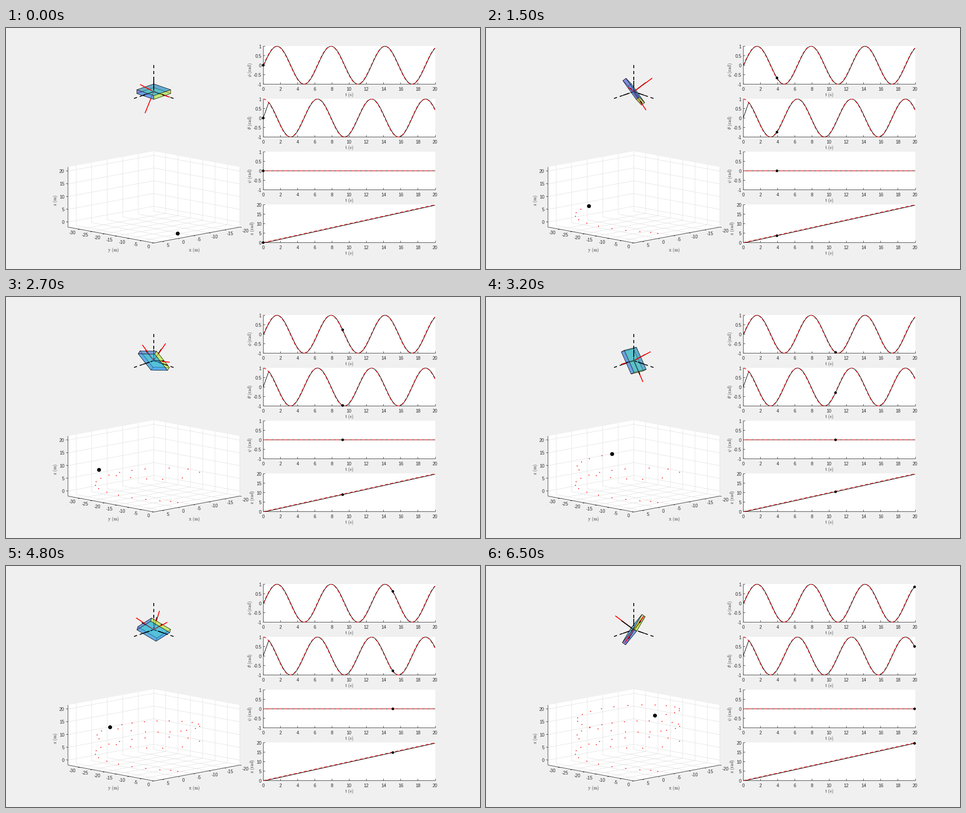
Write a matplotlib script that moves like this. It is 1049x534 px and loops after 6600 ms.

```python
import numpy as np
import matplotlib.pyplot as plt
from matplotlib.animation import FuncAnimation
from matplotlib.patches import Circle, Polygon

plt.rcParams["font.family"] = "Liberation Sans"
plt.rcParams["mathtext.fontset"] = "cm"
plt.rcParams["lines.scale_dashes"] = False
plt.rcParams["toolbar"] = "None"

W, H, DPI = 1049, 534, 100
PX = 72 / DPI
INK = "#262626"
GRID = "#e2e2e2"
RED = (1, 0, 0)

fig = plt.figure(figsize=(W / 100 + 1e-4, H / 100 + 1e-4), dpi=DPI, facecolor="#f0f0f0")
ax = fig.add_axes([0, 0, 1, 1])
# whole numbers fall on pixel centres
ax.set_xlim(-0.5, W - 0.5)
ax.set_ylim(H - 0.5, -0.5)
ax.axis("off")


def line(xs, ys, color=INK, lw=0.9, ls="-", z=1.0):
    art, = ax.plot(xs, ys, color=color, lw=lw * PX, ls=ls, zorder=z,
                   solid_capstyle="butt", dash_capstyle="butt")
    return art


def shape(points, color, z=0.0, edge="none", lw=0.0):
    return ax.add_patch(Polygon(points, closed=True, fc=color, ec=edge, lw=lw * PX,
                                zorder=z, joinstyle="round"))


def dot(x, y, r, color="black", z=20):
    return ax.add_patch(Circle((x, y), r, fc=color, ec="none", zorder=z))


def label(x, y, s, ha="center", rot=0, size=10):
    ax.text(x, y, s, fontsize=size * PX, color=INK, ha=ha, va="center_baseline",
            rotation=rot, rotation_mode="default", zorder=8)


def num(v):
    return f"{v:g}"


# ---- flight model -------------------------------------------------------
LAG = 0.057
DRAG, THRUST = 0.85, 11.5


def goal(t):
    return np.sin(t), np.cos(t)


def attitude(t):
    return np.sin(np.maximum(t - LAG, 0)), np.minimum(1.28 * t, np.cos(t - LAG))


def height(t):
    return t - 0.3 * (1 - np.exp(-t / 0.3))


DT = 0.005
T = np.arange(0, 20 + DT / 2, DT)
PHI, THETA = attitude(T)


def travel(acc):
    v, p, out = 0.0, 0.0, []
    for a in acc:
        out.append(p)
        v += (a - DRAG * v) * DT
        p += v * DT
    return np.array(out)


POS_X = travel(THRUST * np.tan(THETA))
POS_Y = travel(-THRUST * np.tan(PHI) / np.cos(THETA))

# solver steps: (step, time) knots, even in between
KNOTS = [(0, 0), (1, 0.85), (3, 1.56), (7, 2.84), (14, 4.745), (15, 5.24), (16, 5.71),
         (17, 6.29), (18, 7.195), (19, 7.65), (22, 8.64), (23, 9.245), (25, 9.91),
         (26, 10.194), (27, 10.52), (28, 10.748), (31, 11.517), (34, 12.423),
         (37, 13.364), (38, 13.516), (41, 14.288), (43, 14.88), (44, 15.09),
         (49, 16.515), (51, 17.07), (61, 19.945)]
STEPS = np.interp(np.arange(62), *np.array(KNOTS).T)


# ---- time plots ---------------------------------------------------------
X0, X1 = 568.7, 949


def tx(t):
    return X0 + (X1 - X0) * t / 20


class Panel:
    def __init__(self, top, lo, hi, ticks, name, name_x=540):
        self.top, self.bot, self.lo, self.hi = top, top + 84, lo, hi
        shape([(X0, top), (X1, top), (X1, self.bot), (X0, self.bot)], "white")
        line([X0, X0, X1], [top, self.bot, self.bot])
        for v in range(0, 21, 2):
            line([tx(v)] * 2, [self.bot, self.bot - 4])
            label(tx(v), self.bot + 10, num(v))
        for v in ticks:
            line([X0, X0 + 4], [self.y(v)] * 2)
            label(X0 - 4, self.y(v) + 0.5, num(v), "right")
        label((X0 + X1) / 2, self.bot + 21.5, r"$\mathrm{t\ (s)}$")
        label(name_x, (top + self.bot) / 2, name, rot=90)

    def y(self, v):
        return self.bot - (self.bot - self.top) * (v - self.lo) / (self.hi - self.lo)

    def curves(self, real, wanted):
        line(tx(T), self.y(real), "black", 1.1, z=3)
        line(tx(T), self.y(wanted), RED, 1.2, (0, (7 * PX, 4.5 * PX)), z=4)


HALF = [-1, -0.5, 0, 0.5, 1]
panels = [Panel(40, -1, 1, HALF, r"$\phi\ \mathrm{(rad)}$"),
          Panel(157, -1, 1, HALF, r"$\theta\ \mathrm{(rad)}$"),
          Panel(274, -1, 1, HALF, r"$\psi\ \mathrm{(rad)}$"),
          Panel(391, 0, 20, range(0, 21, 5), r"$\mathrm{z\ (rad)}$", 545)]
want_phi, want_theta = goal(T)
panels[0].curves(PHI, want_phi)
panels[1].curves(THETA, want_theta)
panels[2].curves(0 * T, 0 * T)
panels[3].curves(height(T), T)

# ---- flight path box ----------------------------------------------------
XA, XB, YA, YB, ZA, ZB = -20, 7.65, -34.8, 0, -1.95, 21.6


def proj(x, y, z):
    return 379.5 - 6.87 * x + 5.47 * y, 455 + 1.27 * x + 1.01 * y - 5.65 * z


def path(points, **kw):
    return line(*np.array([proj(*p) for p in points]).T, **kw)


shape([proj(*p) for p in [(XB, YA, ZB), (XA, YA, ZB), (XA, YB, ZB),
                          (XA, YB, ZA), (XB, YB, ZA), (XB, YA, ZA)]], "white")


def tick(point, dx, dy):
    x, y = proj(*point)
    line([x, x + dx], [y, y + dy])
    return x, y


for v in range(-20, 6, 5):
    path([(v, YB, ZA), (v, YA, ZA), (v, YA, ZB)], color=GRID)
    x, y = tick((v, YB, ZA), 4, 0.7)
    label(x + 12.7, y + 7.8, num(v))
for v in range(-30, 1, 5):
    path([(XB, v, ZA), (XA, v, ZA), (XA, v, ZB)], color=GRID)
    x, y = tick((XB, v, ZA), -4, 0.7)
    label(x - 9, y + 7.5, num(v), "right")
for v in range(0, 21, 5):
    path([(XB, YA, v), (XA, YA, v), (XA, YB, v)], color=GRID)
    x, y = tick((XB, YA, v), -4, -0.7)
    label(x - 8, y, num(v), "right")
path([(XB, YA, ZB), (XB, YA, ZA), (XB, YB, ZA), (XA, YB, ZA)], z=2)
label(109, 374, r"$\mathrm{z\ (m)}$", rot=90)
label(237, 489, r"$\mathrm{y\ (m)}$")
label(416, 489, r"$\mathrm{x\ (m)}$")

TRAIL = np.array([proj(np.interp(t, T, POS_X), np.interp(t, T, POS_Y), height(t))
                  for t in STEPS])

# ---- attitude view ------------------------------------------------------
VIEW = np.array([0.664, 0.664, 0.342])
SIZE = np.array([0.43, 0.43, 0.07])
# face colours by axis: (minus side, plus side)
FACES = [((0.25, 0.32, 0.98), (0.35, 0.43, 0.85)),
         ((0.42, 0.36, 0.82), (0.98, 0.98, 0.06)),
         ((0.10, 0.70, 0.90), (0.20, 0.70, 0.68))]
DASH = (7, 6.2)


def spot(v):
    return np.array([326.5 + 43.7 * (v[1] - v[0]),
                     140.5 + 15.1 * (v[0] + v[1]) - 59.3 * v[2]])


def rotation(phi, theta):
    a, b, c, d = np.cos(phi), np.sin(phi), np.cos(theta), np.sin(theta)
    rx = np.array([[1, 0, 0], [0, a, -b], [0, b, a]])
    ry = np.array([[c, 0, d], [0, 1, 0], [-d, 0, c]])
    return rx @ ry


def spoke(v, length, R, color, dash=None, lw=1.9):
    """Axis from tip to centre, split where it enters the box."""
    body = R.T @ v
    reach = SIZE / np.maximum(np.abs(body), 1e-9)
    j = int(np.argmin(reach))
    cut = min(reach[j], length)
    front = np.sign(body[j]) * R[:, j] @ VIEW > 0
    depth = 0.1 * (v @ VIEW)
    tip, mid, hub = spot(v * length), spot(v * cut), spot(v * 0)
    done, out = 0.0, []
    for p, q, z in ((tip, mid, 5 if front else 1), (mid, hub, 3)):
        span = np.hypot(*(q - p))
        if span < 0.1:
            continue
        ls = (done * PX, tuple(d * PX for d in dash)) if dash else "-"
        out.append(line([p[0], q[0]], [p[1], q[1]], color, lw, ls, z + depth))
        done += span
    return out


def box(R):
    out = []
    for j in range(3):
        a, b = [i for i in range(3) if i != j]
        for side in (-1, 1):
            corners = []
            for sa, sb in ((-1, -1), (1, -1), (1, 1), (-1, 1)):
                c = np.zeros(3)
                c[j], c[a], c[b] = side, sa, sb
                corners.append(spot(R @ (c * SIZE)))
            front = side * R[:, j] @ VIEW > 0
            color = FACES[j][side > 0] + (0.5,)
            out.append(shape(corners, color, 4 if front else 2, (0, 0, 0, 0.8), 0.7))
    return out


live = []


def clear():
    while live:
        live.pop().remove()
    return []


def draw(n):
    clear()
    k = max(0, n - 4)
    t = STEPS[k]
    phi, theta = attitude(t)
    R, G = rotation(phi, theta), rotation(*goal(t))
    live.extend(box(R))
    for i, e in enumerate(np.eye(3)):
        live.extend(spoke(e, 1, R, "black", DASH))
        live.extend(spoke(e, 0.55, R, "black", (7, 2)))
        live.extend(spoke(G[:, i], 0.82, R, RED))
        live.extend(spoke(R[:, i], 0.54, R, "black"))
    for p, v in zip(panels, (phi, theta, 0, height(t))):
        live.append(dot(tx(t), p.y(v), 2.9))
    live.append(dot(*TRAIL[k], 4.3))
    live.append(dot(*TRAIL[k], 0.8, (0.55, 0, 0), 21))
    live.extend(dot(x, y, 1.05, RED, 19) for x, y in TRAIL[:k])
    return live


anim = FuncAnimation(fig, draw, frames=66, interval=100, init_func=clear,
                     repeat=True, repeat_delay=0, blit=False)
plt.show()
```
